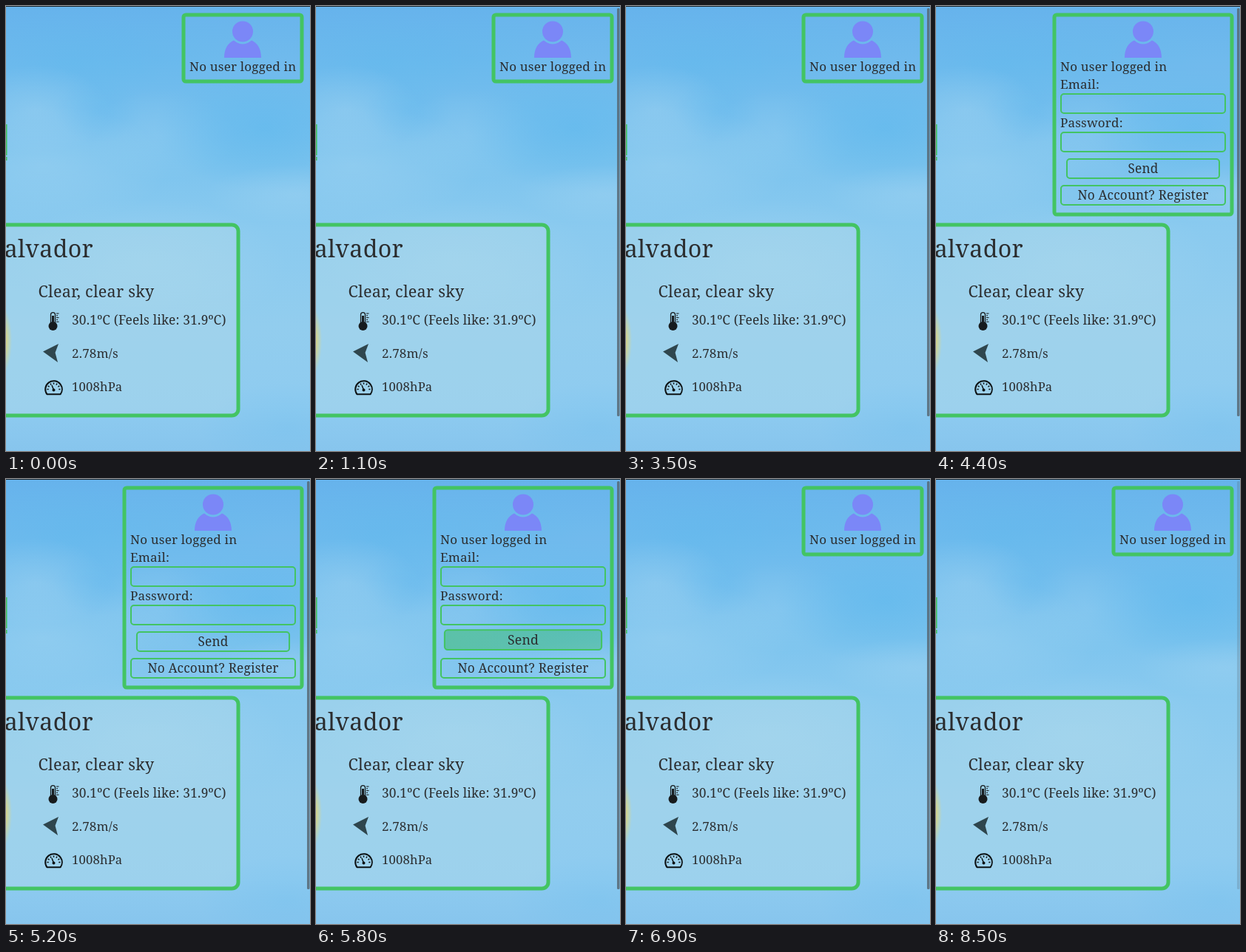
These frames come from a looping animation (411 by 602 pixels, 9100 ms). An HTML page with a canvas:

```html
<!DOCTYPE html>
<html lang="en">
<head>
<meta charset="utf-8">
<title>Weather card</title>
<style>
html, body { margin: 0; width: 100%; height: 100%; overflow: hidden; background: #82c5ee; }
canvas { display: block; }
</style>
</head>
<body>
<canvas id="stage" width="411" height="602"></canvas>
<script>
const W = 411, H = 602, LOOP = 9100;
const GREEN = '#43c463', INK = '#2b2d2f', BLACK = '#171b1d';
const ctx = document.getElementById('stage').getContext('2d');

const clamp = v => Math.max(0, Math.min(1, v));
const smooth = v => { v = clamp(v); return v * v * (3 - 2 * v); };
// Rises from `start`, falls from `end`
const hover = (t, start, end, ms) => smooth((t - start) / ms) * (1 - smooth((t - end) / ms));

function text(str, x, y, size = 17, align = 'left') {
  ctx.font = `500 ${size}px "Noto Serif", serif`;
  ctx.letterSpacing = `${size * 0.012}px`;
  ctx.textAlign = align;
  ctx.fillStyle = INK;
  ctx.fillText(str, x, y);
}

// Bordered box given by its outer edges
function box(x0, y0, x1, y1, line, radius, fill) {
  const h = line / 2;
  ctx.beginPath();
  ctx.roundRect(x0 + h, y0 + h, x1 - x0 - line, y1 - y0 - line, radius - h);
  if (fill) { ctx.fillStyle = fill; ctx.fill(); }
  ctx.lineWidth = line;
  ctx.strokeStyle = GREEN;
  ctx.stroke();
}

function blob(c, x, y, rx, ry, rgb, alpha) {
  c.save();
  c.translate(x, y);
  c.scale(rx, ry);
  const g = c.createRadialGradient(0, 0, 0, 0, 0, 1);
  g.addColorStop(0, `rgba(${rgb},${alpha})`);
  g.addColorStop(0.5, `rgba(${rgb},${alpha * 0.55})`);
  g.addColorStop(1, `rgba(${rgb},0)`);
  c.fillStyle = g;
  c.fillRect(-1, -1, 2, 2);
  c.restore();
}

function makeSky() {
  const sky = document.createElement('canvas');
  sky.width = W;
  sky.height = H;
  const c = sky.getContext('2d');
  const g = c.createLinearGradient(0, 0, 0, H);
  [[0, '#66b3ec'], [0.16, '#70bbed'], [0.34, '#7bc3ee'], [0.5, '#8acaef'],
   [0.72, '#92cdee'], [0.9, '#8ecbf0'], [1, '#87c5ed']]
    .forEach(([stop, color]) => g.addColorStop(stop, color));
  c.fillStyle = g;
  c.fillRect(0, 0, W, H);
  const pale = '166,214,241', blue = '96,185,237';
  blob(c, 85, 75, 130, 70, blue, 0.45);
  blob(c, 40, 140, 100, 60, pale, 0.4);
  blob(c, 50, 215, 170, 80, pale, 0.42);
  blob(c, 210, 175, 100, 60, pale, 0.25);
  blob(c, 125, 140, 60, 45, blue, 0.3);
  blob(c, 350, 165, 150, 85, blue, 0.65);
  blob(c, 210, 70, 150, 60, blue, 0.3);
  blob(c, 390, 255, 120, 40, pale, 0.35);
  blob(c, 190, 350, 190, 90, pale, 0.4);
  blob(c, 380, 570, 120, 60, blue, 0.2);
  return sky;
}

function person(cx) {
  ctx.fillStyle = '#7b87f7';
  ctx.beginPath();
  ctx.arc(cx, 34.5, 14, 0, Math.PI * 2);
  ctx.fill();
  ctx.beginPath();
  ctx.moveTo(cx - 25, 70);
  ctx.bezierCurveTo(cx - 25, 58, cx - 20, 50, cx - 12, 46.5);
  ctx.quadraticCurveTo(cx, 56.5, cx + 12, 46.5);
  ctx.bezierCurveTo(cx + 20, 50, cx + 25, 58, cx + 25, 70);
  ctx.fill();
}

function thermometer() {
  ctx.strokeStyle = ctx.fillStyle = BLACK;
  ctx.lineWidth = 1.3;
  ctx.beginPath();
  ctx.roundRect(60.5, 414.7, 6, 18, 3);
  ctx.stroke();
  ctx.fillRect(62, 419, 3, 12);
  ctx.beginPath();
  ctx.arc(63.5, 433, 6, 0, Math.PI * 2);
  ctx.fill();
  for (let i = 0; i < 5; i++) ctx.fillRect(68, 415.5 + i * 2.8, i % 2 ? 2 : 3.5, 1);
}

function windArrow() {
  ctx.fillStyle = '#2f464e';
  ctx.beginPath();
  [[50, 467.5], [71, 457], [66.5, 469], [70, 482]].forEach(p => ctx.lineTo(...p));
  ctx.fill();
}

function gauge() {
  const cx = 64.5, cy = 518.5;
  ctx.strokeStyle = ctx.fillStyle = '#0c1113';
  ctx.lineWidth = 2;
  ctx.lineJoin = 'round';
  ctx.beginPath();
  ctx.arc(cx, cy, 11.3, Math.PI * 0.8, Math.PI * 2.2);
  ctx.closePath();
  ctx.stroke();
  ctx.lineWidth = 1.5;
  ctx.beginPath();
  for (let i = 0; i <= 6; i++) {
    const a = Math.PI * (1 + i / 6), x = Math.cos(a), y = Math.sin(a);
    ctx.moveTo(cx + x * 6.8, cy + y * 6.8);
    ctx.lineTo(cx + x * 9, cy + y * 9);
  }
  ctx.moveTo(cx - 2.5, cy - 5.5);
  ctx.lineTo(cx, cy + 1);
  ctx.stroke();
  ctx.beginPath();
  ctx.arc(cx, cy + 1, 2, 0, Math.PI * 2);
  ctx.fill();
}

function card() {
  box(-200, 293.5, 316.5, 556.5, 5, 11, 'rgba(178,217,231,0.38)');
  blob(ctx, -7, 453, 15, 48, '255,216,70', 1);
  text('San Salvador', 118, 340, 32, 'right');
  text('Clear, clear sky', 43.5, 394, 21.5);
  text('30.1ºC (Feels like: 31.9ºC)', 89, 431, 17.3);
  text('2.78m/s', 89, 476);
  text('1008hPa', 89, 521, 16.6);
  thermometer();
  windArrow();
  gauge();
}

function field(y, glow) {
  box(168, y, 392, y + 28, 2, 5, `rgba(190,225,235,${0.3 * glow})`);
}

// Grows and lifts slightly while hovered
function button(label, x0, x1, y, glow) {
  const cx = (x0 + x1) / 2, cy = y + 14, k = 1 + 0.03 * glow;
  ctx.save();
  ctx.translate(cx, cy - 2.4 * glow);
  ctx.scale(k, k);
  ctx.translate(-cx, -cy);
  const g = ctx.createLinearGradient(x0, 0, x1, 0);
  g.addColorStop(0, `rgba(67,190,125,${0.62 * glow})`);
  g.addColorStop(1, `rgba(67,190,125,${0.48 * glow})`);
  box(x0, y, x1, y + 28, 2, 5, g);
  text(label, cx, y + 20, 17.2, 'center');
  ctx.restore();
}

function panel(t) {
  const open = (t >= 2600 && t < 3500) || (t >= 4400 && t < 6900);
  const left = open ? 157 : 237;
  box(left + 0.5, 9.5, 402.5, open ? 284.5 : 104.5, 5, 5.5, 'rgba(120,185,235,0.12)');
  person((left + 403) / 2);
  text('No user logged in', left + 11, 88);
  if (!open) return;
  text('Email:', 168, 112);
  field(118, Math.max(hover(t, 2850, 3050, 150), hover(t, 4750, 4950, 150)));
  text('Password:', 168, 164);
  field(170, 0);
  button('Send', 176, 384, 206, hover(t, 5180, 5850, 300));
  button('No Account? Register', 168, 392, 242, hover(t, 5900, 6300, 300));
}

function scrollbar(t) {
  const step = Math.floor(t / 100);
  const alpha = clamp((step - 9) / 2) * (1 - 0.7 * clamp((step - 82) / 3));
  ctx.fillStyle = `rgba(88,104,116,${0.85 * alpha})`;
  ctx.beginPath();
  ctx.roundRect(407, 3, 3.5, 552, 1.5);
  ctx.fill();
}

const sky = makeSky();

function draw(now) {
  const t = now % LOOP;
  ctx.drawImage(sky, 0, 0);
  ctx.fillStyle = '#1d2328';
  ctx.fillRect(0, 0, W, 1);
  ctx.fillStyle = GREEN;
  ctx.fillRect(0, 160, 1.5, 42);
  ctx.fillRect(0, 204, 1.5, 5);
  card();
  panel(t);
  scrollbar(t);
  requestAnimationFrame(draw);
}
requestAnimationFrame(draw);
</script>
</body>
</html>
```
